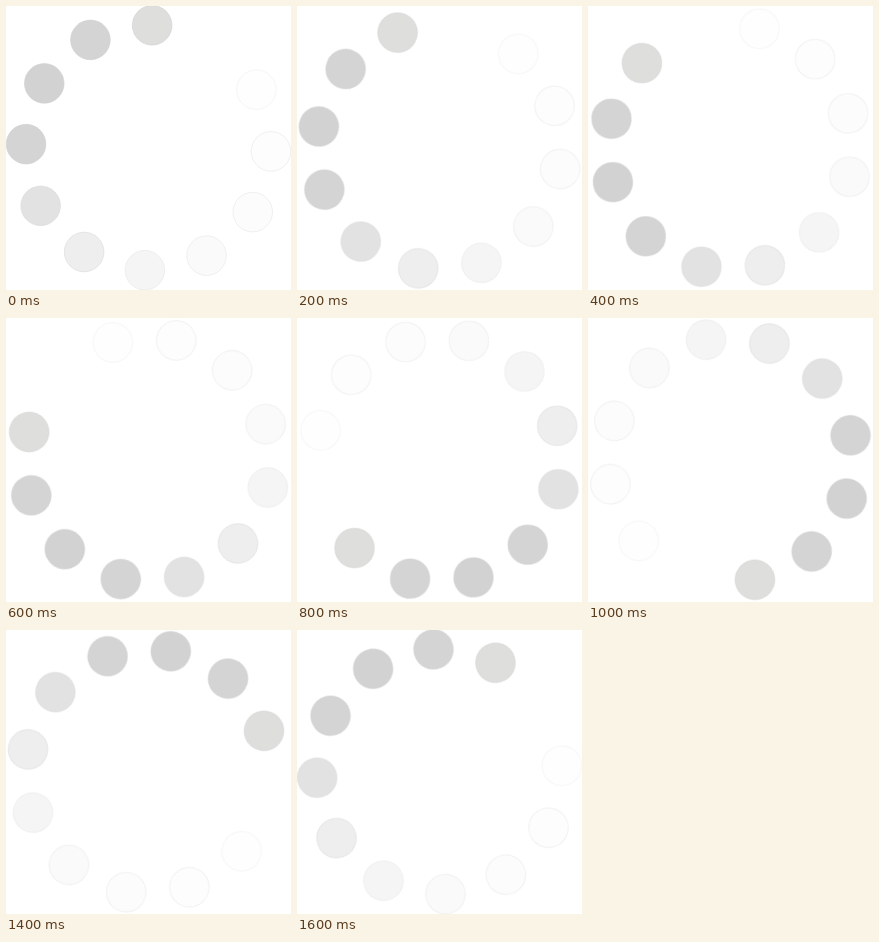
Recreate the animation shown at these times as an HTML page. Size 285 px wide and 284 px high, loop 1.7 s.

```html
<!DOCTYPE html>
<html lang="en">
<head>
<meta charset="utf-8">
<title>Loading ring</title>
<style>
  html, body { margin: 0; width: 100%; height: 100%; overflow: hidden; background: #fff; }
  svg { display: block; width: 285px; height: 284px; }
  #ring { transform-origin: 142.5px 141.75px; animation: spin 1700ms step-end infinite; }
  circle { stroke-width: .6; }

  /* Turns in 100 ms ticks: slow build-up, a sudden surge, then a gentle slowdown */
  @keyframes spin {
    0%     { transform: rotate(0deg); }
    5.88%  { transform: rotate(-10.3deg); }
    11.76% { transform: rotate(-21.7deg); }
    17.64% { transform: rotate(-34.3deg); }
    23.52% { transform: rotate(-48deg); }
    29.41% { transform: rotate(-63deg); }
    35.29% { transform: rotate(-78.6deg); }
    41.17% { transform: rotate(-108.6deg); }
    47.05% { transform: rotate(-137.8deg); }
    52.94% { transform: rotate(-166deg); }
    58.82% { transform: rotate(-193.2deg); }
    64.70% { transform: rotate(-219.2deg); }
    70.58% { transform: rotate(-243.9deg); }
    76.47% { transform: rotate(-268deg); }
    82.35% { transform: rotate(-291.2deg); }
    88.23% { transform: rotate(-313.2deg); }
    94.11% { transform: rotate(-334.5deg); }
    100%   { transform: rotate(-360deg); }
  }
</style>
</head>
<body>
<svg viewBox="0 0 285 284"><g id="ring"></g></svg>
<script>
  const ring = document.getElementById('ring');
  const fills = ['#dededc', '#d4d4d4', '#d2d2d2', '#d4d4d4', '#e2e2e2', '#eee',
                 '#f5f5f5', '#fafafa', '#fcfcfc', '#fdfdfd', '#fefefe'];
  const cx = 142.5, cy = 141.75, radius = 122.5;

  // Twelve slots, one left empty ahead of the first dot
  fills.forEach((fill, i) => {
    const a = (-88.3 - 30 * i) * Math.PI / 180;
    const dot = document.createElementNS('http://www.w3.org/2000/svg', 'circle');
    const attrs = {
      cx: cx + radius * Math.cos(a),
      cy: cy + radius * Math.sin(a),
      r: 19.8,
      fill,
      stroke: i < 4 ? '#cfcfcf' : i < 6 ? '#d8d8d8' : i < 10 ? '#e6e6e6' : '#eee'
    };
    for (const key in attrs) dot.setAttribute(key, attrs[key]);
    ring.append(dot);
  });
</script>
</body>
</html>
```
